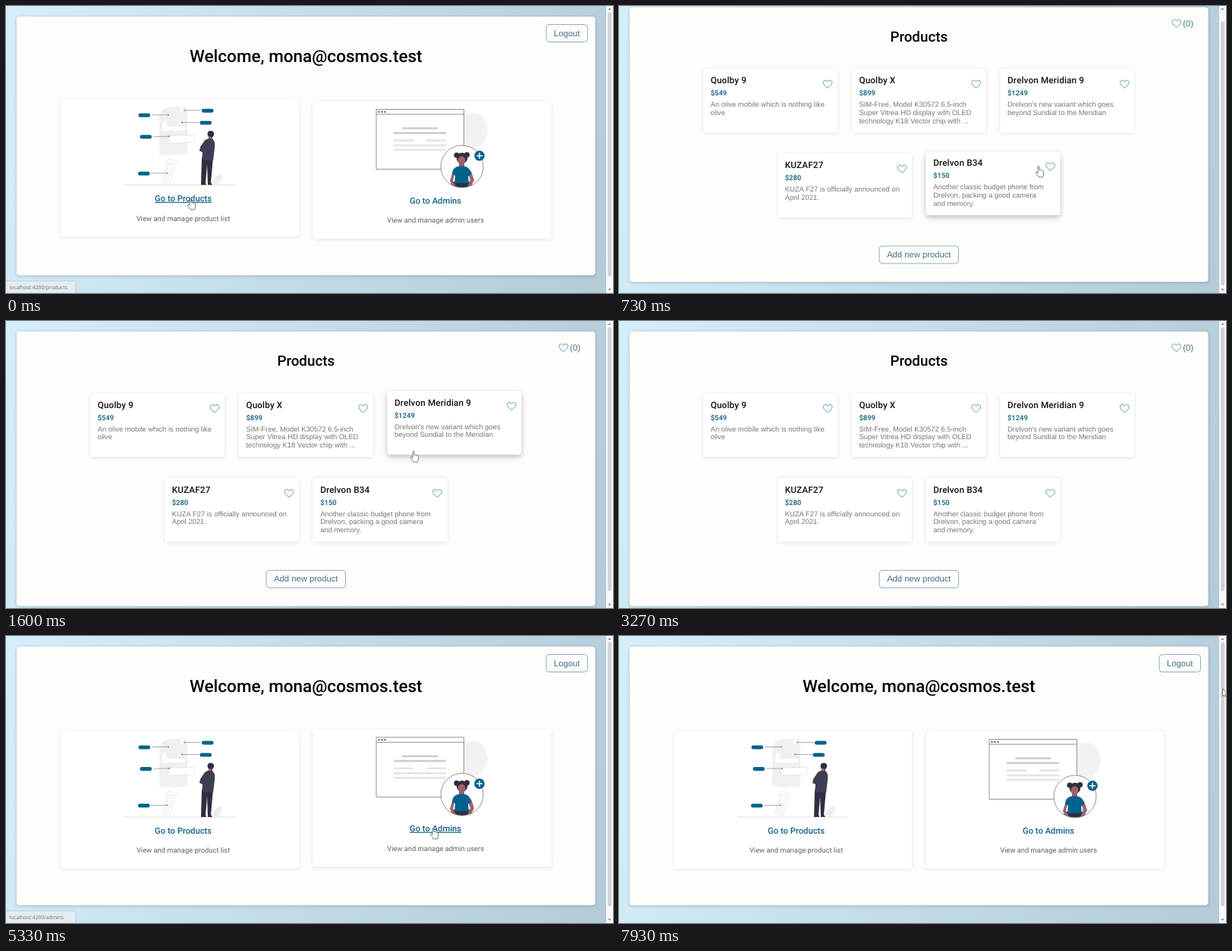
Animation, 800 px wide and 379 px high, one loop 8 s. Source, as an HTML page:

```html
<!DOCTYPE html>
<html lang="en">
<head>
<meta charset="utf-8">
<title>Product admin demo</title>
<style>
  html, body { margin: 0; height: 100%; overflow: hidden; }
  body { background: linear-gradient(105deg, #d5eefb, #b3cad7); }
  svg { display: block; width: 100%; height: 100%; }
  text { font: 9.37px Roboto, sans-serif; fill: #5f6163; text-rendering: geometricPrecision; }
  .mid { text-anchor: middle; }
  .h1 { font-size: 22.5px; font-weight: 500; fill: #000; }
  .h2 { font-size: 18.8px; font-weight: 500; fill: #000; }
  .link { font-size: 11.24px; font-weight: 500; fill: #15618a; }
  .name { font-size: 11.72px; font-weight: 500; letter-spacing: .0125em; fill: #111; }
  .price { font-weight: 700; fill: #2b6f8d; }
  .info, .button { font-family: "Liberation Sans", Arial, sans-serif; }
  .info { font-size: 9.43px; fill: #777; }
  .button { font-size: 11.24px; fill: #42708a; }
  .status { font: 6.8px "Open Sans", sans-serif; fill: #6b7278; }
  .outline { fill: none; stroke: #3d809e; stroke-width: .8; }
  .frame { fill: none; stroke: #6c9db3; stroke-width: .8; }
  .panel { fill: #fffdfb; filter: drop-shadow(0 1px 2px rgba(0, 0, 0, .2)); }
  .card { fill: #fff; }
  .pointer { fill: #fff; stroke: #444; stroke-width: .7; stroke-linejoin: round; }
</style>
</head>
<body>
<svg viewBox="0 0 800 379">
  <defs>
    <path id="heart" class="outline" d="M0 5C-8-.2-6.5-5-3.2-5-1.5-5-.4-4 0-3 .4-4 1.5-5 3.2-5 6.5-5 8-.2 0 5Z"/>
    <clipPath id="round"><circle cx="601" cy="212" r="27.6"/></clipPath>
    <g id="shelf">
      <path fill="#f0f0f0" d="M202 198V150Q203 136 218 136H239V198Q220 201 202 198Z"/>
      <path fill="#fff" d="M230 137h4v6h-4zM206 167V160Q207 153 214 153H236V167Z"/>
      <path fill="#f0f0f0" d="M211 153H239V162H211Z"/>
      <g fill="#fff" stroke="#dedede" stroke-width=".7">
        <path d="M214 174L248 173V183L214 184Z"/>
        <path d="M214 204L225 208 216 237 206 234Z"/>
        <path d="M215 209L221 211 213 232 209 231Z"/>
      </g>
      <path fill="#eee" d="M273 238Q274 225 284 225 287 231 279 238Z"/>
      <path stroke="#d5d5d5" stroke-width=".8" d="M156 239H302"/>
      <g id="labels"></g>
      <path fill="#2f2e41" d="M258 203L273 202 270 236 272 239H266L265 212 263 236 264 239H257Z"/>
      <path fill="#3f3d56" d="M262 180Q267 176 272 178 276 181 275 190L273 207 258 206 259 196 255 194 256 189Z"/>
      <path fill="#a0616a" d="M266 172h6v6h-5z"/>
      <path fill="#2f2e41" d="M266 174Q264 168 270 167.500 275 168 274 173 272 178 269 175Z"/>
    </g>
    <g id="profile">
      <path fill="#f2f2f2" d="M603 144Q618 137 629 147 639 161 632 177 624 190 605 188Z"/>
      <g fill="#fff" stroke="#666" stroke-width=".7">
        <path d="M488 136.500H603.500V215.500H488ZM488 143H603.500"/>
        <circle cx="601" cy="212" r="28"/>
      </g>
      <path stroke="#3f3d56" stroke-width="2.200" stroke-linecap="round" d="M491.500 139.800h0M495.500 139.800h0M499.500 139.800h0"/>
      <path stroke="#cbcbcb" stroke-width="2.500" d="M522 161.500H569M511 167.700H580"/>
      <path stroke="#e4e4e4" stroke-width="2.500" d="M511 177.500H537M554 177.500H580M511 184H580M511 190H580"/>
      <g clip-path="url(#round)">
        <path fill="#2f2e41" d="M588 232H612L618 243H582Z"/>
        <path fill="#a0616a" d="M592 218L589 231 594 240 590 241 585 231 589 218ZM608 218L612 230 608 239 612 240 617 230 613 218ZM597 204h7v10h-7z"/>
        <path fill="#00628c" d="M588 222Q588 213 597 211.500L604 211.500Q612 213 613 222L609 225 610 234H591L592 224Z"/>
      </g>
      <g fill="#2f2e41">
        <circle cx="594" cy="197" r="3.600"/><circle cx="607.500" cy="196.500" r="3.600"/>
        <circle cx="601" cy="201" r="7.200"/>
      </g>
      <ellipse fill="#a0616a" cx="600.500" cy="204" rx="5" ry="5.800"/>
      <circle fill="#00628c" cx="624" cy="197.800" r="6.800"/>
      <path stroke="#fff" stroke-width="1.500" d="M620 197.800h8M624 193.800v8"/>
    </g>
  </defs>

  <g id="page">
    <rect id="panel" class="panel" x="14" y="14" width="762.500" rx="4"/>
    <g id="welcome">
      <rect class="frame" x="712" y="24.500" width="54.500" height="23" rx="4"/>
      <text class="button mid" x="739.300" y="39.700">Logout</text>
      <text class="h1 mid" x="395.300" y="74">Welcome, mona@cosmos.test</text>
    </g>
    <g id="products">
      <text class="h2 mid" x="395.300" y="59">Products</text>
      <use href="#heart" x="734.700" y="35.300"/>
      <text class="button" x="743.300" y="39">(0)</text>
      <rect class="frame" x="343" y="329.300" width="104.500" height="23" rx="4"/>
      <text class="button mid" x="395.300" y="344.300">Add new product</text>
    </g>
    <g id="error">
      <text class="h2 mid" x="395.300" y="176.500">Access error</text>
      <text class="mid" x="395.300" y="211.700">You are not authorized to view this data. Please login as admin and try again.</text>
    </g>
  </g>

  <g id="status">
    <path fill="#e3ecf1" stroke="#b4c0c7" stroke-width=".7" d="M-1 363H90Q92 363 92 365V380H-1Z"/>
    <text id="address" class="status" x="4.500" y="374"></text>
  </g>

  <path fill="#f7f8f9" d="M791 0h9v379h-9z"/>
  <path fill="#888" d="M793.300 5L795.500 2.500 797.700 5ZM793.300 373.500H797.700L795.500 376Z"/>
  <rect id="thumb" x="793.200" y="8" width="4.800" height="349" rx="2.400" fill="#cdd3d7"/>

  <path id="hand" class="pointer" d="M-.9 1Q0-.5 .9 1V5.500Q2.500 5 3.100 6 4.700 5.600 5.200 6.600 6.800 6.500 6.700 8V11Q6.300 13 5.300 15H.3Q-.8 12.500-3.500 9.600-3.800 8-2.400 8L-.9 9.500Z"/>
  <path id="arrow" class="pointer" d="M0 0V10L2.300 7.900 3.800 11.300 5.300 10.600 3.900 7.400H7Z"/>
</svg>

<script>
const LOOP = 8000;
const $ = id => document.getElementById(id);
const clamp = v => Math.max(0, Math.min(1, v));
const between = (t, from, to) => t >= from && t < to;
const ramp = (t, start, length) => {
  const p = clamp((t - start) / length);
  return p * p * (3 - 2 * p);
};
const show = (id, on) => $(id).setAttribute('display', on ? 'inline' : 'none');
const place = (el, x, y) => el.setAttribute('transform', `translate(${x} ${y})`);

function addGroup(parent, markup) {
  const group = document.createElementNS('http://www.w3.org/2000/svg', 'g');
  group.innerHTML = markup;
  $(parent).append(group);
  return group;
}

// Blue labels: left edge, centre height, line start and end
[[174.5, 147, 192, 214], [258, 141, 257, 235], [255.500, 157, 255, 232],
 [176.500, 175.500, 194, 215], [174, 224, 191, 213]].forEach(([x, y, from, to]) => addGroup('labels',
  `<rect x="${x}" y="${y - 2.500}" width="15.500" height="5" rx="2.300" fill="#00628c"/>
   <path d="M${from} ${y - .5}H${to}" stroke="#8a8a8a" stroke-width=".7"/>
   <circle cx="${to}" cy="${y - .5}" r="1" fill="#888"/>`));

// Each card rises while the pointer is over it, during the listed spans
const tiles = [
  { x: 72, art: 'shelf', title: 'Go to Products', info: 'View and manage product list', spans: [[-500, 200]] },
  { x: 404.500, art: 'profile', title: 'Go to Admins', info: 'View and manage admin users', spans: [[4760, 5530]] }
];
for (const tile of tiles) {
  const mid = tile.x + 161.600;
  tile.el = addGroup('welcome',
    `<rect class="card" x="${tile.x}" y="126" width="314" height="181.300" rx="4"/>
     <use href="#${tile.art}"/>
     <text class="link mid" x="${mid}" y="260.500">${tile.title}</text>
     <text class="mid" x="${mid}" y="286.300">${tile.info}</text>`);
  tile.link = tile.el.querySelector('.link');
  castShadow(tile.el, 0);
}

const goods = [
  { x: 111, y: 95.500, name: 'Quolby 9', price: 549, spans: [],
    lines: ['An olive mobile which is nothing like', 'olive'] },
  { x: 306.700, y: 95.500, name: 'Quolby X', price: 899, spans: [[1960, 2260]],
    lines: ['SIM-Free, Model K30572 6.5-inch', 'Super Vitrea HD display with OLED', 'technology K18 Vector chip with ...'] },
  { x: 502.300, y: 95.500, name: 'Drelvon Meridian 9', price: 1249, spans: [[1060, 1605]],
    lines: ["Drelvon's new variant which goes", 'beyond Sundial to the Meridian'] },
  { x: 209, y: 207.500, name: 'KUZAF27', price: 280, spans: [[220, 390]],
    lines: ['KUZA F27 is officially announced on', 'April 2021.'] },
  { x: 404.500, y: 207.500, name: 'Drelvon B34', price: 150, spans: [[430, 960]],
    lines: ['Another classic budget phone from', 'Drelvon, packing a good camera', 'and memory.'] }
];
for (const item of goods) {
  const { x, y } = item, left = x + 9.700;
  item.el = addGroup('products',
    `<rect class="card" x="${x}" y="${y}" width="177" height="84" rx="4"/>
     <text class="name" x="${left}" y="${y + 19.300}">${item.name}</text>
     <text class="price" x="${left}" y="${y + 35.300}">$${item.price}</text>
     ${item.lines.map((line, i) => `<text class="info" x="${left}" y="${y + 50 + i * 10.700}">${line}</text>`).join('')}
     <use href="#heart" x="${x + 164}" y="${y + 20}"/>`);
}

function castShadow(el, up) {
  el.querySelector('.card').style.filter =
    `drop-shadow(0 ${1.500 + 2 * up}px ${2.500 + up}px rgba(0, 0, 0, ${.11 + .14 * up}))`;
}

const lift = (t, spans) => spans.reduce((sum, [on, off]) => sum + ramp(t, on, 110) - ramp(t, off, 90), 0);

// Pointer routes: time, x, y; the pointer is off stage between routes
const routes = [
  [[0, 243, 254], [100, 243, 254], [400, 390, 240], [700, 553, 211], [930, 553, 211], [1060, 575, 168],
   [1300, 588, 140], [1530, 540, 160], [1600, 537, 171], [1660, 533, 188], [1870, 533, 188],
   [2040, 465, 150], [2260, 320, 95], [2400, 191, 79], [2470, 191, 79]],
  [[4070, 5, 30], [4270, 300, 175], [4440, 650, 281], [4540, 650, 281], [4730, 563, 253],
   [5500, 563, 253], [5900, 400, 180], [6330, 95, 41], [6470, 26, 14], [6530, 26, 14]],
  [[7670, 120, 140], [7740, 310, 268], [7830, 560, 190], [7930, 795.500, 69.500], [8000, 795.500, 69.500]]
];
const handTimes = [[0, 160], [240, 400], [460, 960], [1060, 1640], [1960, 2260], [4700, 5530]];

function pointerAt(t) {
  const route = routes.find(r => between(t, r[0][0], r.at(-1)[0]));
  if (!route) return null;
  const next = route.findIndex(p => p[0] > t);
  const [t0, x0, y0] = route[next - 1], [t1, x1, y1] = route[next];
  const p = (t - t0) / (t1 - t0);
  return [x0 + (x1 - x0) * p, y0 + (y1 - y0) * p];
}

function draw(t) {
  const onProducts = between(t, 200, 3930), onError = between(t, 5530, 7130);
  show('products', onProducts);
  show('error', onError);
  show('welcome', !onProducts && !onError);

  const scroll = 12.300 * (ramp(t, 480, 150) - ramp(t, 1000, 150));
  place($('page'), 0, -scroll);
  place($('thumb'), 0, scroll);
  $('panel').setAttribute('height', onProducts ? 362.500 : 341.500);

  for (const tile of tiles) {
    place(tile.el, 0, -2.700 * lift(t, tile.spans));
    tile.link.style.textDecoration = tile.spans.some(s => between(t, ...s)) ? 'underline' : 'none';
  }
  for (const item of goods) {
    const up = lift(t, item.spans);
    place(item.el, 0, -3 * up);
    castShadow(item.el, up);
  }

  show('status', t < 130 || between(t, 4780, 5500));
  $('address').textContent = 'localhost:4200/' + (t < 130 ? 'products' : 'admins');

  const pos = pointerAt(t), hand = handTimes.some(s => between(t, ...s));
  show('hand', pos && hand);
  show('arrow', pos && !hand);
  if (pos) place($(hand ? 'hand' : 'arrow'), ...pos);
}

function tick() {
  draw(performance.now() % LOOP);
  requestAnimationFrame(tick);
}
tick();
</script>
</body>
</html>
```
